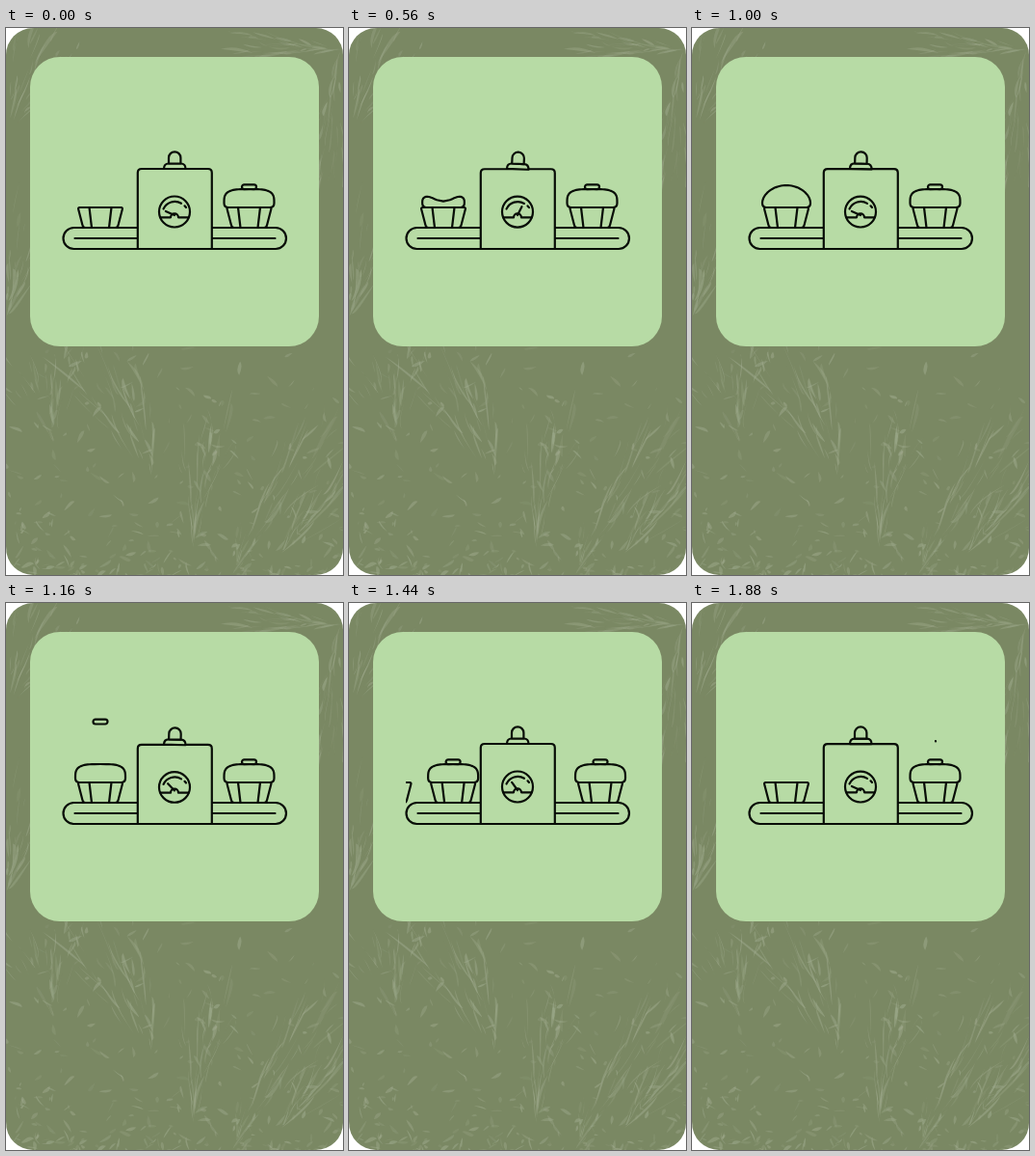
These frames come from a looping animation (350x567 px, 1920 ms). An HTML page with a canvas:

```html
<!DOCTYPE html>
<html lang="en">
<head>
<meta charset="utf-8">
<title>Muffin conveyor</title>
<style>
  html, body { margin: 0; width: 100%; height: 100%; overflow: hidden; background: #fff; }
  canvas, svg { position: absolute; left: 0; top: 0; width: 350px; height: 567px; }
  canvas { border-radius: 28px; }
  .line { fill: none; stroke: #080d07; stroke-width: 2.2; stroke-linecap: round; stroke-linejoin: round; }
  .solid { fill: #b7dba5; }
</style>
</head>
<body>
<canvas id="paper" width="350" height="567"></canvas>
<svg viewBox="0 0 350 567">
  <defs>
    <clipPath id="belt"><rect x="59" y="100" width="232" height="140"/></clipPath>
    <g id="tray">
      <path class="solid" d="M-21.500 186H21.500Q23.300 186 22.800 188L18.500 204.500Q17.800 207 15.500 207H-15.500Q-17.800 207 -18.500 204.500L-22.800 188Q-23.300 186 -21.500 186Z"/>
      <path d="M-11.500 186L-9 207M11.500 186L9 207"/>
    </g>
    <rect id="cap" class="solid" x="-7.500" y="-2.400" width="15" height="4.900" rx="2.400"/>
    <g id="muffin">
      <use href="#tray"/>
      <path id="dome" class="solid"/>
      <use href="#cap" y="164.700"/>
    </g>
    <path id="wisp" pathLength="1" d="M0 0C1.500 -3 -4 -4 -4 -8S.5 -13 0 -18"/>
  </defs>
  <rect class="solid" x="25" y="30" width="300" height="300" rx="31"/>
  <g class="line">
    <rect x="59.500" y="207" width="231.500" height="22" rx="11"/>
    <path d="M71.500 218H279.500"/>
    <g clip-path="url(#belt)">
      <use id="nextTray" href="#tray"/>
      <g id="work">
        <use href="#tray"/>
        <path id="batter" class="solid"/>
        <use id="drop" href="#cap"/>
      </g>
      <use id="leaving" href="#muffin"/>
      <g id="ready">
        <use href="#muffin"/>
        <use class="steam" href="#wisp" x="-9.500" y="163"/>
        <use class="steam" href="#wisp" x=".5" y="161"/>
        <use class="steam" href="#wisp" x="13" y="161.500"/>
      </g>
    </g>
    <g id="machine">
      <path class="solid" d="M136.800 229V150Q136.800 146 140.800 146H209.800Q213.800 146 213.800 150V229Z"/>
      <g id="lamp">
        <path class="solid" d="M164 146Q164 140.500 169 140.500H181.500Q186.500 140.500 186.500 146Z"/>
        <path class="solid" d="M169 140.500V134.500A6.200 6.200 0 0 1 181.400 134.500V140.500Z"/>
      </g>
      <circle cx="175" cy="190.500" r="16"/>
      <path d="M163.500 187.500A13 13 0 0 1 182 181.800M185.500 184.300L187 186M160.500 196.300H171A4 4 0 0 1 179 196.300H189.500"/>
      <path id="needle" d="M175 194H165"/>
    </g>
  </g>
</svg>
<script>
const LOOP = 1920, STEP = 40, LEFT = 98, RIGHT = 252.5;
const MIDDLE = (LEFT + RIGHT) / 2, OUTSIDE = 65;
const el = id => document.getElementById(id);
const mix = (a, b, p) => a + (b - a) * p;
const part = (t, from, to) => Math.min(1, Math.max(0, (t - from) / (to - from)));
const inOut = p => p < .5 ? 4 * p ** 3 : 1 - 4 * (1 - p) ** 3;
const show = (node, on) => { node.style.display = on ? '' : 'none'; };
const place = (node, x) => node.setAttribute('transform', `translate(${x} 0)`);

// Fans of creases in the crumpled film: [x, y, direction, spread, length], in degrees and pixels.
const fans = [
  [0, 110, -62, 34, 135], [350, 22, 182, 9, 118], [348, 15, 98, 10, 170],
  [0, 300, -72, 22, 130], [195, 540, -84, 16, 150], [235, 567, -62, 18, 190],
  [155, 480, -112, 24, 190], [285, 545, -50, 28, 190], [50, 430, -110, 50, 110]
];

function paintPaper() {
  const c = el('paper').getContext('2d');
  let seed = 71;
  const rnd = () => (seed = (seed * 16807) % 2147483647) / 2147483647;
  const off = s => (rnd() + rnd() - 1) * s;
  c.fillStyle = '#7a8863';
  c.fillRect(0, 0, 350, 567);

  function blade(x, y, angle, length, width) {
    c.save();
    c.translate(x, y);
    c.rotate(angle);
    c.fillStyle = `rgba(163,174,146,${mix(.12, .5, rnd())})`;
    const bend = off(length / 4), end = off(length / 8);
    c.beginPath();
    c.moveTo(0, 0);
    c.quadraticCurveTo(length * rnd(), bend + width, length, end);
    c.quadraticCurveTo(length * rnd(), bend - width, 0, 0);
    c.fill();
    c.restore();
  }

  for (const [x, y, direction, spread, reach] of fans) {
    for (let i = 0; i < 38; i++) {
      const a = (direction + off(spread)) * Math.PI / 180;
      const r = reach * rnd() * .85;
      blade(x + r * Math.cos(a), y + r * Math.sin(a), a + off(.3),
        reach * mix(.06, .32, rnd()), mix(.6, 3.5, rnd() ** 2));
    }
  }
  // Small flakes, denser towards the lower edge.
  for (let i = 0; i < 330; i++) {
    blade(rnd() * 350, 570 - 240 * rnd() ** 2.6, off(3), mix(4, 16, rnd()), mix(1, 4, rnd()));
  }
}

// Dough outline: a superellipse that swells with grow and flattens with settle.
function dough(grow, settle) {
  const w = mix(20, 25, grow) + settle;
  const h = 18.5 * grow ** 1.3 - 4 * settle;
  const power = mix(.45 + .6 * grow ** 4, .58, settle);
  const dip = 14 * grow * (1 - grow);
  const lip = 4.5 * Math.min(1, grow * 5), foot = w - lip, side = 186 - lip;
  let d = `M${-foot} 186Q${-w} 186 ${-w} ${side}`;
  for (let i = 1; i <= 40; i++) {
    const a = Math.PI * (1 - i / 40), cos = Math.cos(a), sin = Math.abs(Math.sin(a));
    const x = Math.sign(cos) * Math.abs(cos) ** power;
    const y = side - h * sin ** power + dip * sin * Math.cos(Math.PI * x);
    d += `L${w * x} ${y}`;
  }
  return d + `Q${w} 186 ${foot} 186Z`;
}

// The needle rests low, lifts a little, then kicks to the far side; twice a loop.
function needleAngle(t) {
  const a = t / LOOP * 4 * Math.PI;
  const lift = Math.max(0, Math.sin(a - Math.PI / 6));
  const kick = Math.max(0, Math.cos(a - Math.PI * 1.25)) ** 6;
  return 24 + 32 * lift + 114 * kick;
}

function drawBelt(t) {
  const move = inOut(part(t, 1360, 1610));
  const moving = move > 0 && move < 1, done = move === 1;
  show(el('nextTray'), moving);
  show(el('leaving'), moving);
  place(el('nextTray'), LEFT + OUTSIDE * (move - 1));
  place(el('leaving'), RIGHT + OUTSIDE * move);
  place(el('work'), done ? LEFT : mix(LEFT, MIDDLE, move));
  place(el('ready'), moving ? mix(MIDDLE, RIGHT, move) : RIGHT);

  show(el('batter'), t > 300 && !done);
  el('batter').setAttribute('d', dough(part(t, 300, 1000), part(t, 1040, 1160)));
  show(el('drop'), t >= 1160 && !done);
  const y = mix(123, 164.7, part(t, 1160, 1325) ** 2);
  const tilt = t < 1360 ? -5 * part(t, 1160, 1280) : 0;
  el('drop').setAttribute('transform', `translate(0 ${y}) rotate(${tilt})`);
}

const steams = [...document.querySelectorAll('.steam')];

function drawSteam(t) {
  steams.forEach((wisp, i) => {
    const early = 40 * Math.abs(i - 1);
    const head = part(t, 1440, 1605), tail = part(t, 1570, 1886 - early);
    show(wisp, head > tail);
    wisp.style.strokeDasharray = `${Math.max(.001, head - tail)} 3`;
    wisp.style.strokeDashoffset = -tail;
  });
}

function drawMachine(t) {
  const phase = t / 480 * 2 * Math.PI;
  const press = 1 - .006 * (1 - Math.cos(phase));
  const tilt = 3 * Math.max(0, Math.sin(phase));
  el('machine').setAttribute('transform', `translate(0 229) scale(1 ${press}) translate(0 -229)`);
  el('lamp').setAttribute('transform', `rotate(${tilt} 175 146)`);
  el('needle').setAttribute('transform', `rotate(${needleAngle(t)} 175 194)`);
}

paintPaper();
el('dome').setAttribute('d', dough(1, 1));
const start = performance.now();
function tick() {
  const t = Math.floor((performance.now() - start) % LOOP / STEP) * STEP;
  drawBelt(t);
  drawSteam(t);
  drawMachine(t);
  requestAnimationFrame(tick);
}
tick();
</script>
</body>
</html>
```
